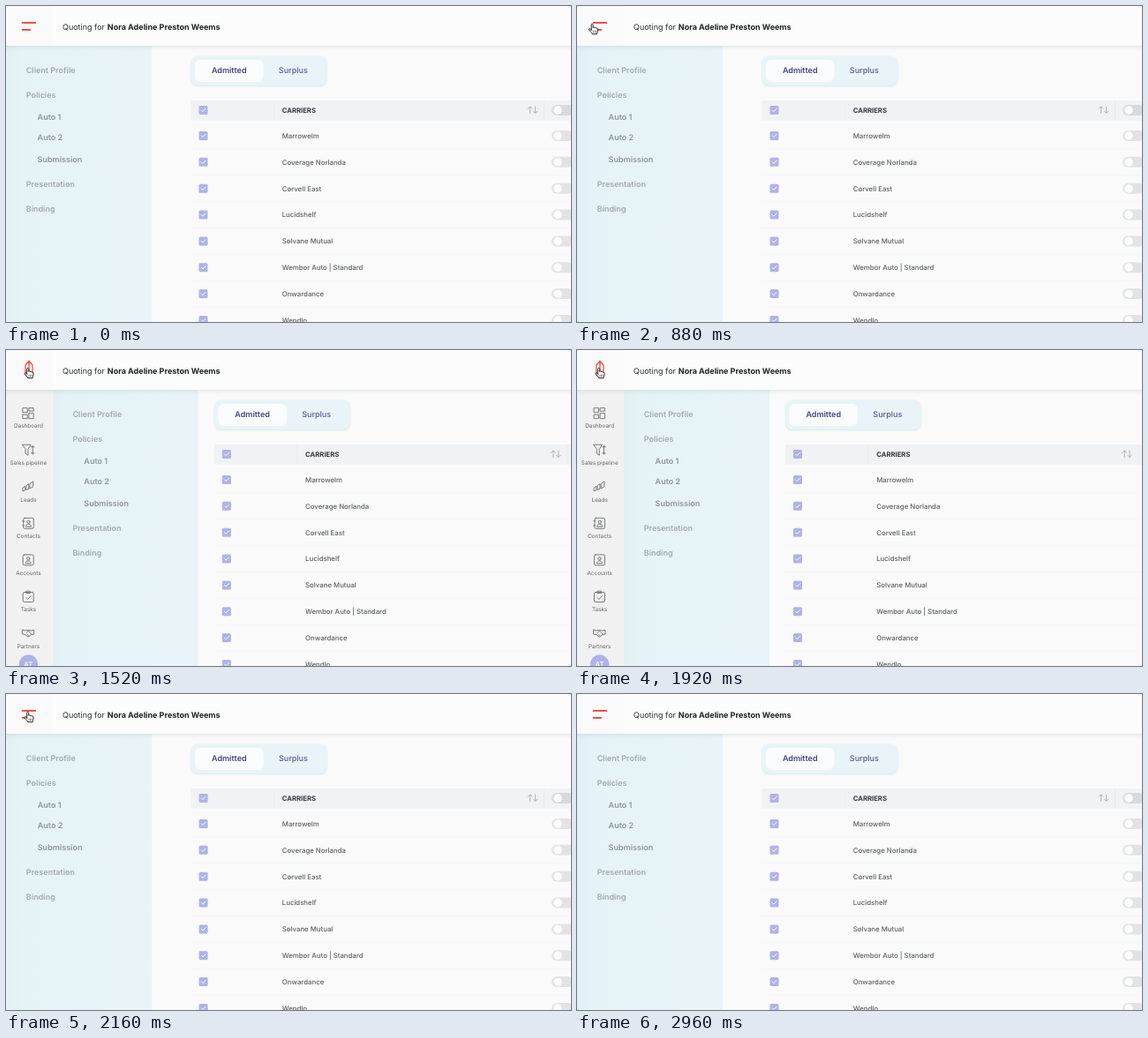
Write an HTML page with a canvas that moves like this. It is 640 px wide and 358 px high and loops after 3360 ms.

```html
<!DOCTYPE html>
<html lang="en">
<head>
<meta charset="utf-8">
<title>Quoting</title>
<style>
html, body { margin: 0; width: 100%; height: 100%; overflow: hidden; background: #fafafa; }
canvas { display: block; width: 640px; height: 358px; }
</style>
</head>
<body>
<canvas id="stage"></canvas>
<script>
const W = 640, H = 358, LOOP = 3360, STEP = 80;
const MENU_W = 53, ROW = 29.85;
const canvas = document.getElementById('stage');
const ctx = canvas.getContext('2d');
const dpr = window.devicePixelRatio || 1;
canvas.width = W * dpr;
canvas.height = H * dpr;

const clamp = v => Math.max(0, Math.min(1, v));
const mix = (a, b, p) => a + (b - a) * p;

// cubic-bezier(.25, .1, .25, 1)
function ease(x) {
  x = clamp(x);
  let lo = 0, hi = 1, u = x;
  for (let i = 0; i < 24; i++) {
    u = (lo + hi) / 2;
    const bx = 0.75 * u * (1 - u) + u * u * u;
    if (bx < x) lo = u; else hi = u;
  }
  return 0.3 * u * (1 - u) ** 2 + 3 * u * u * (1 - u) + u ** 3;
}
const toggled = (t, on, off) => ease((t - on) / 200) - ease((t - off) / 200);

function text(str, x, y, size, weight, color, align = 'left') {
  ctx.font = `${weight} ${size}px Inter, sans-serif`;
  ctx.textAlign = align;
  ctx.fillStyle = color;
  ctx.fillText(str, x, y);
}
function rect(x, y, w, h, color) {
  ctx.fillStyle = color;
  ctx.fillRect(x, y, w, h);
}
function round(x, y, w, h, r, color) {
  ctx.fillStyle = color;
  ctx.beginPath();
  ctx.roundRect(x, y, w, h, r);
  ctx.fill();
}
function disc(x, y, r, color) {
  ctx.fillStyle = color;
  ctx.beginPath();
  ctx.arc(x, y, r, 0, 7);
  ctx.fill();
}
function stroke(d, color, width) {
  ctx.strokeStyle = color;
  ctx.lineWidth = width;
  ctx.stroke(new Path2D(d));
}
function at(x, y, draw) {
  ctx.save();
  ctx.translate(x, y);
  draw();
  ctx.restore();
}

const carriers = ['Marrowelm', 'Coverage Norlanda', 'Corvell East', 'Lucidshelf',
  'Solvane Mutual', 'Wembor Auto | Standard', 'Onwardance', 'Wendlo'];

function checkbox(y) {
  round(218.5, y - 5, 10, 10, 1.5, '#b0b2e7');
  stroke(`M221.2 ${y} l1.6 1.6 3.2 -3.2`, '#fff', 1);
}
function toggle(y, track) {
  round(618, y - 6, 25, 12, 6, track);
  disc(625, y, 4.7, '#fcfcfc');
}

function drawMain() {
  ctx.save();
  ctx.shadowColor = 'rgba(170,210,218,.45)';
  ctx.shadowBlur = 2 * dpr;
  ctx.shadowOffsetY = dpr;
  round(209.5, 56.5, 154, 33.5, 8, '#e8f4f7');
  ctx.restore();
  round(214, 61, 77.5, 25, 6, '#fbfcfd');
  text('Admitted', 252.7, 76.3, 9, 600, '#41457f', 'center');
  text('Surplus', 325.3, 76.3, 9, 500, '#565b92', 'center');

  rect(209.5, 107, 470, 22.5, '#f0f2f3');
  rect(303, 107, 1, 22.5, '#ebedee');
  rect(609, 107, 1, 22.5, '#e9ebec');
  checkbox(118);
  text('CARRIERS', 312.7, 120.9, 7.7, 700, '#35383b');
  stroke('M593.6 121.5 V114 M591.2 116.4 L593.6 114 L596 116.4', '#abadaf', 0.9);
  stroke('M599.5 114 V121.5 M597.1 119.1 L599.5 121.5 L601.9 119.1', '#abadaf', 0.9);
  toggle(118, '#d9dadb');

  carriers.forEach((name, i) => {
    const y = 147 + i * ROW;
    checkbox(y);
    text(name, 312.7, y + 2.8, 7.8, 500, '#5b5d5f');
    toggle(y, '#e2e3e3');
    rect(209.5, y + 14.6, 470, 0.7, '#f5f6f6');
  });
}

const nav = [['Client Profile', 22.7, 75.8], ['Policies', 22.7, 103.8], ['Auto 1', 35.6, 129],
  ['Auto 2', 35.6, 151.8], ['Submission', 35.6, 177], ['Presentation', 22.7, 205], ['Binding', 22.7, 233]];

function drawNav() {
  const fill = ctx.createLinearGradient(0, 0, 165, 0);
  fill.addColorStop(0, '#e2f0f3');
  fill.addColorStop(0.1, '#e6f3f6');
  fill.addColorStop(1, '#e8f4f7');
  rect(0, 45, 165, H, fill);
  for (const [label, x, y] of nav)
    text(label, x, y, 9, 600, x > 30 ? '#8e9698' : '#a2aaac');
}

// Each icon is centred on the origin.
const menu = [
  ['Dashboard', 'M-6 -6h5v5h-5z M1 -6h5v3.5h-5z M-6 1.5h5v4.5h-5z M1 0h5v6h-5z'],
  ['Sales pipeline', 'M-6.5 -6H3L-.2 -1V6L-3.2 4V-1z M5 -5V5 M3.2 -3.5H6.8 M3.2 3.5H6.8'],
  ['Leads', 'M-6 1l2.5 -1.5v4.5l-2.5 1z M-2 -1.5l2.5 -1.5v5.5l-2.5 1z M2 -3.5l3.5 -2.5v6l-3.5 2z'],
  ['Contacts', 'M-4 -6h8.5q1.5 0 1.5 1.5v9q0 1.5 -1.5 1.5h-8.5q-1.5 0 -1.5 -1.5v-9q0 -1.5 1.5 -1.5z' +
    'M2 -1.5a1.7 1.7 0 1 1 -3.4 0a1.7 1.7 0 1 1 3.4 0 M-2.7 3.5c0 -3.5 6 -3.5 6 0z M-6.7 -2.5h2 M-6.7 2.5h2'],
  ['Accounts', 'M-4.5 -6h9q1.5 0 1.5 1.5v9q0 1.5 -1.5 1.5h-9q-1.5 0 -1.5 -1.5v-9q0 -1.5 1.5 -1.5z' +
    'M1.7 -1.5a1.7 1.7 0 1 1 -3.4 0a1.7 1.7 0 1 1 3.4 0 M-3 3.5c0 -3.5 6 -3.5 6 0z'],
  ['Tasks', 'M-4.5 -5h9q1.5 0 1.5 1.5v8q0 1.5 -1.5 1.5h-9q-1.5 0 -1.5 -1.5v-8q0 -1.5 1.5 -1.5z' +
    'M-2 -6.3h4v2.3h-4z M-2.5 1L-.5 3L3 -1'],
  ['Partners', 'M-6.5 -4l3 1l3.5 -.8l3.5 .8l3 -1v5l-3 .5l-3.5 2.5l-3.5 -2.5l-3 -.5z M-2 -.5L0 -3L4 1.5 M-1 1.5l1.5 1.5']
];

function drawMenu(w) {
  ctx.save();
  ctx.beginPath();
  ctx.rect(0, 45, w, H);
  ctx.clip();
  ctx.translate(w - MENU_W, 0);
  rect(0, 45, MENU_W, H, '#f1f1f1');
  menu.forEach(([label, icon], i) => {
    const y = 71.7 + i * 41.55;
    at(25.5, y, () => stroke(icon, '#6c6e70', 0.9));
    text(label, 25.7, y + 16.7, 6.4, 400, '#626466', 'center');
  });
  disc(25.7, 356, 10.7, '#b0b3e8');
  text('AT', 25.7, 359, 8, 500, '#fff', 'center');
  ctx.restore();
}

function drawHeader() {
  ctx.save();
  ctx.shadowColor = 'rgba(60,70,75,.14)';
  ctx.shadowBlur = 6 * dpr;
  ctx.shadowOffsetY = dpr;
  rect(-10, -10, W + 20, 55, '#fcfcfc');
  ctx.restore();
  rect(0, 0, MENU_W, 45, '#fafafa');
  text('Quoting for', 64, 26.7, 9, 400, '#2c2f33');
  text('Nora Adeline Preston Weems', 114.8, 26.7, 9, 700, '#1e2126');
}

function drawBurger(p) {
  const red = '#ee5146';
  at(26, 22.5, () => {
    if (p < 0.03) {
      round(-8.3, -4.4, 16.6, 1.9, 1, red);
      round(-8.3, 3.6, 10.5, 1.9, 1, red);
      return;
    }
    ctx.rotate(p * Math.PI / 2);
    ctx.globalAlpha = mix(0.3, 1, p);
    stroke('M-10 0L-5.5 -4H6L9 0L6 4H-5.5z M-10 0H9', red, mix(0.8, 1.3, p));
  });
}

const hand = 'M3.2 7.2V1.4c0 -1.5 2 -1.5 2 0V4.4c.3 -.9 1.9 -.8 1.9 .3c.4 -.7 1.8 -.5 1.8 .5' +
  'c.5 -.5 1.6 -.2 1.6 .8V8.2c0 1.3 -.8 1.7 -.9 3.5H4.3C4 9.9 1.6 8.6 .6 6.7c-.4 -1 .8 -1.6 1.6 -.7z';
const arrow = 'M0 0V11L2.6 8.6L4.3 12.3L6 11.5L4.4 8H8z';

function drawCursor(t) {
  if (t < 640 || t > 2640) return;
  const leave = clamp((t - 2160) / 480) ** 2;
  const x = t < 880 ? mix(-14, 13, (t - 640) / 240)
    : mix(13, 20.5, clamp((t - 880) / 160)) + 30 * leave;
  const y = 20.1 + 342 * leave;
  const overIcon = x > 8 && y < 36;
  at(x, y, () => {
    const shape = new Path2D(overIcon ? hand : arrow);
    ctx.fillStyle = overIcon ? '#fff' : '#222';
    ctx.strokeStyle = overIcon ? '#222' : '#fff';
    ctx.lineWidth = 1;
    ctx.fill(shape);
    ctx.stroke(shape);
    if (overIcon) stroke('M5.4 8v2 M7 8v2 M8.6 8v2', '#333', 0.6);
  });
}

function render(now) {
  const t = Math.min(Math.floor((now % LOOP) / STEP) * STEP, 2960);
  const w = MENU_W * toggled(t, 1339, 1975);
  ctx.setTransform(dpr, 0, 0, dpr, 0, 0);
  ctx.textRendering = 'geometricPrecision';
  ctx.lineJoin = ctx.lineCap = 'round';
  rect(0, 0, W, H, '#fafafa');
  at(w / 2, 0, drawMain);
  at(w, 0, drawNav);
  drawMenu(w);
  drawHeader();
  drawBurger(toggled(t, 1320, 1960));
  drawCursor(t);
}

const start = performance.now();
function tick() {
  render(performance.now() - start);
  requestAnimationFrame(tick);
}
tick();
</script>
</body>
</html>
```
